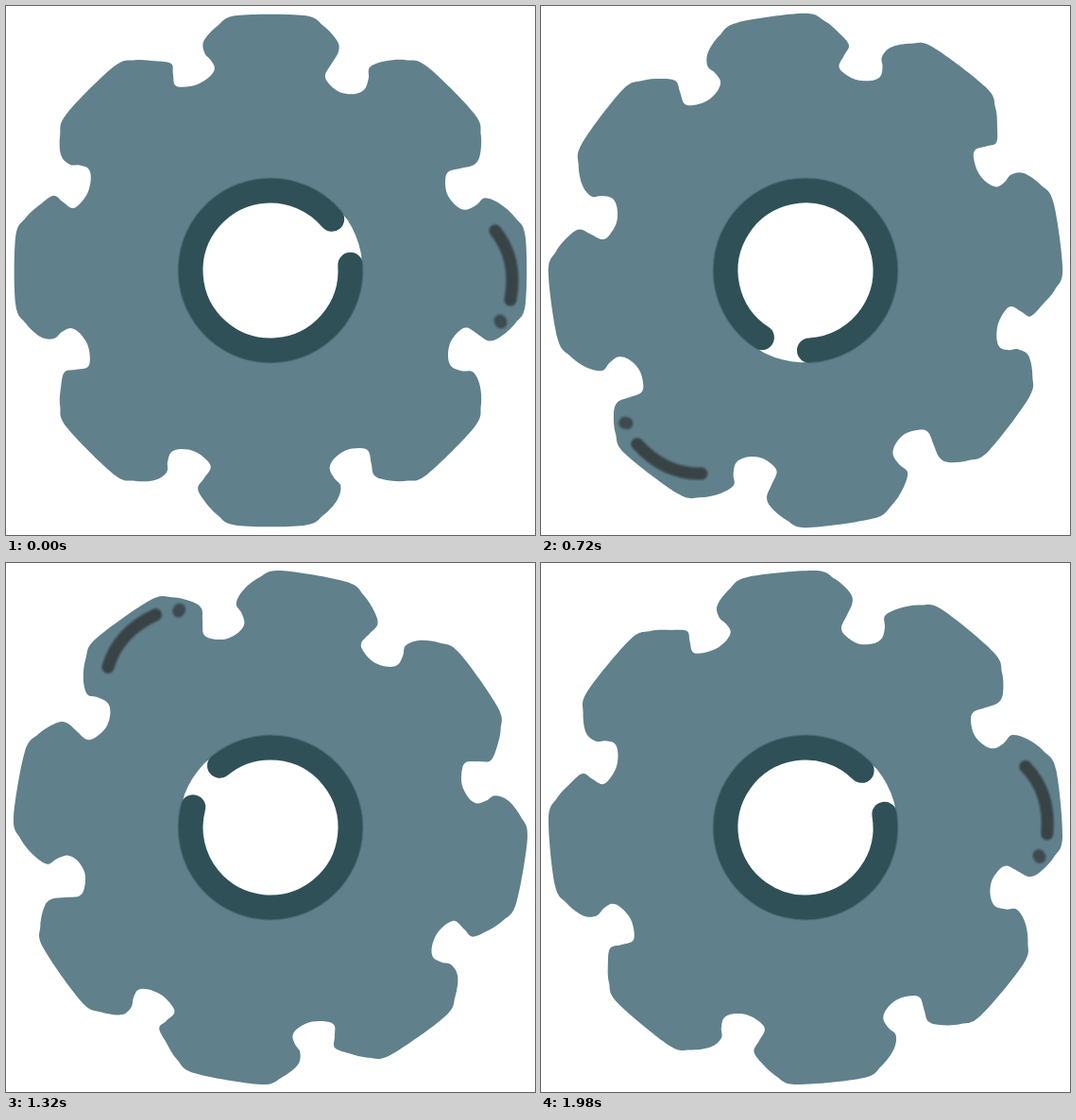
Animation of 560 by 560 pixels, one loop 2.01 s. Source, as an HTML page with a canvas:

```html
<!DOCTYPE html>
<html lang="en">
<head>
<meta charset="utf-8">
<title>Rotating gear</title>
<style>
html, body { margin: 0; width: 100%; height: 100%; overflow: hidden; background: #fff; }
canvas { display: block; width: 560px; height: 560px; }
</style>
</head>
<body>
<canvas id="stage" width="560" height="560"></canvas>
<script>
const ctx = document.getElementById('stage').getContext('2d');
const LOOP = 2010, STEP = 30, SIZE = 560, TEETH = 8;
const BODY = '#60808b', RING = '#2f5057', DARK = '#363f42';
const BORE = 71.5, HUB = 98;
const TAU = Math.PI * 2, rad = deg => deg * Math.PI / 180;

// Radius and angle in degrees; zero points up, clockwise
const lobeCorner = [[272.2, 7.4], [265, 12.2], [253, 16.2]];
const notch = [[243, -4.2], [231, -4.9], [218, -5.8], [211, -4], [207, 0],
  [211, 4], [219, 6], [230, 5.6], [240, 4.6]];

const polar = (r, deg) => [r * Math.sin(rad(deg)), -r * Math.cos(rad(deg))];

function gearPoints() {
  const pts = [], pitch = 360 / TEETH;
  const add = (r, deg) => pts.push(polar(r, deg));
  for (let k = 0; k < TEETH; k++) {
    const axis = k * pitch;
    for (const [r, a] of [...lobeCorner].reverse()) add(r, axis - a);
    for (const [r, a] of lobeCorner) add(r, axis + a);
    // Notches get shallower and drift forward around the gear
    const wear = k - (TEETH - 1) / 2;
    for (const [r, a] of notch) {
      const depth = (243 - r) / 36;
      add(r + 1.3 * wear * depth, axis + pitch / 2 + a + 0.3 * wear);
    }
  }
  return pts;
}

// Closed smooth curve through all points
function smooth(pts) {
  const path = new Path2D(), n = pts.length;
  const at = i => pts[(i + n) % n];
  path.moveTo(...pts[0]);
  for (let i = 0; i < n; i++) {
    const [a, b, c, d] = [at(i - 1), at(i), at(i + 1), at(i + 2)];
    path.bezierCurveTo(
      b[0] + (c[0] - a[0]) / 6, b[1] + (c[1] - a[1]) / 6,
      c[0] - (d[0] - b[0]) / 6, c[1] - (d[1] - b[1]) / 6,
      c[0], c[1]);
  }
  path.closePath();
  return path;
}

const gear = smooth(gearPoints());
const slit = new Path2D('M238 -42Q262 -12 254 31');
const dot = new Path2D('M243 53L244 55');

function disc(r, color) {
  ctx.fillStyle = color;
  ctx.beginPath();
  ctx.arc(0, 0, r, 0, TAU);
  ctx.fill();
}

function arc(r, from, to, width, color) {
  ctx.strokeStyle = color;
  ctx.lineWidth = width;
  ctx.beginPath();
  ctx.arc(0, 0, r, rad(from), rad(to));
  ctx.stroke();
}

// Thick stroke with a blurred edge
function softStroke(path, width, strength) {
  ctx.strokeStyle = DARK;
  for (let i = 0; i < 4; i++) {
    ctx.globalAlpha = strength * (0.2 + i * 0.2);
    ctx.lineWidth = width - i * 2;
    ctx.stroke(path);
  }
  ctx.globalAlpha = 1;
}

function draw(ms) {
  const u = Math.floor(ms % LOOP / STEP) * STEP / LOOP;
  ctx.setTransform(1, 0, 0, 1, 0, 0);
  ctx.fillStyle = '#fff';
  ctx.fillRect(0, 0, SIZE, SIZE);
  ctx.translate(SIZE / 2, SIZE / 2);
  ctx.rotate(rad(360 * u - 2 * Math.sin(Math.PI * u)));
  ctx.lineCap = 'round';

  ctx.fillStyle = BODY;
  ctx.fill(gear);

  // The ring's round ends leave the keyway open
  disc(HUB - 0.5, '#fff');
  arc((BORE + HUB) / 2, -4, 320, HUB - BORE, RING);
  arc(HUB, -8, 325, 1.5, 'rgba(80,112,120,0.6)');

  softStroke(slit, 16, 0.9);
  softStroke(dot, 16, 0.65);
}

const start = performance.now();
function tick() {
  draw(performance.now() - start);
  requestAnimationFrame(tick);
}
tick();
</script>
</body>
</html>
```
